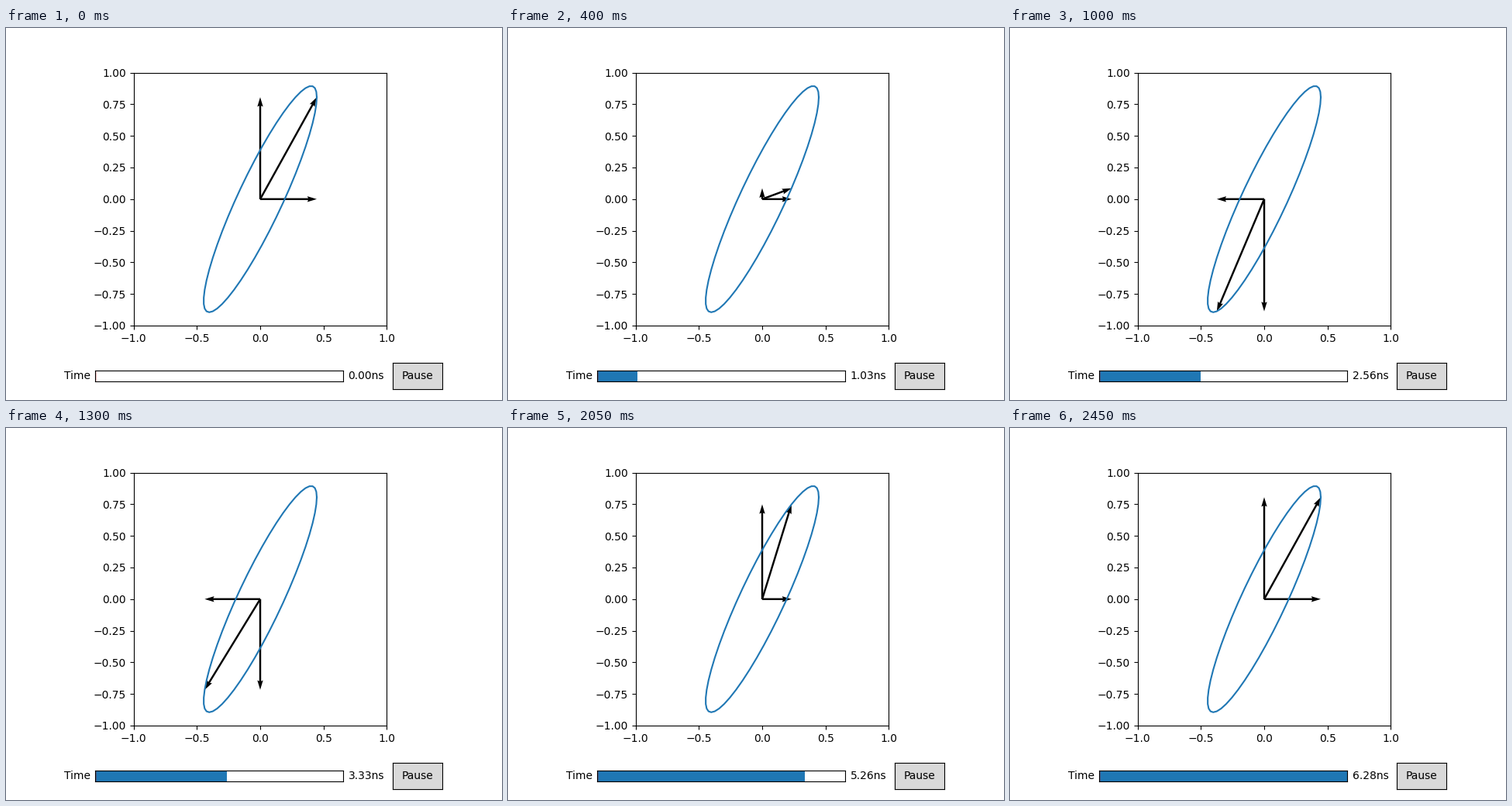
A matplotlib script that plays this animation: 640x480 px, repeating every 2500 ms.

```python
import numpy as np
import matplotlib.pyplot as plt
from matplotlib.animation import FuncAnimation
from matplotlib.patches import Rectangle

FRAMES = 50
PERIOD = 2 * np.pi
PHASE = np.pi / 7
AMP_X, AMP_Y = 1 / np.sqrt(5), 2 / np.sqrt(5)
times = np.linspace(0, PERIOD, FRAMES)


def field(t):
    """Components of the elliptically polarised field at time t."""
    return AMP_X * np.cos(t), AMP_Y * np.cos(t + PHASE)


def panel(rect, color="white"):
    """A bare framed box for a control."""
    box = fig.add_axes(rect, facecolor=color)
    box.set(xticks=[], yticks=[])
    return box


fig, ax = plt.subplots(figsize=(6.4, 4.8), dpi=100)
fig.subplots_adjust(left=0.125, right=0.9, bottom=0.2, top=0.88)
ax.set_aspect("equal")
ax.set(xlim=(-1, 1), ylim=(-1, 1))
ax.set_xticks(np.linspace(-1, 1, 5))
ax.set_yticks(np.linspace(-1, 1, 9))
ax.plot(*field(times))

x0, y0 = field(0)
arrows = ax.quiver([0, 0, 0], [0, 0, 0], [x0, 0, x0], [0, y0, y0],
                   angles="xy", scale_units="xy", scale=1)

# Time slider
slider = panel([0.18, 0.05, 0.5, 0.03])
slider.set(xlim=(0, PERIOD), ylim=(0, 1))
bar = slider.add_patch(Rectangle((0, 0), 0, 1, facecolor="C0"))
slider.axvline(0, color="r", lw=1)
slider.text(-0.02, 0.5, "Time", transform=slider.transAxes,
            ha="right", va="center")
readout = slider.text(1.02, 0.5, "", transform=slider.transAxes,
                      ha="left", va="center")

# Pause button
button = panel([0.78, 0.03, 0.1, 0.07], "0.85")
button.text(0.5, 0.5, "Pause", transform=button.transAxes,
            ha="center", va="center")


def update(i):
    t = times[i]
    x, y = field(t)
    arrows.set_UVC([x, 0, x], [0, y, y])
    bar.set_width(t)
    readout.set_text(f"{t:.2f}ns")
    return arrows, bar, readout


anim = FuncAnimation(fig, update, frames=FRAMES, interval=50,
                     repeat=True, repeat_delay=0)
plt.show()
```
